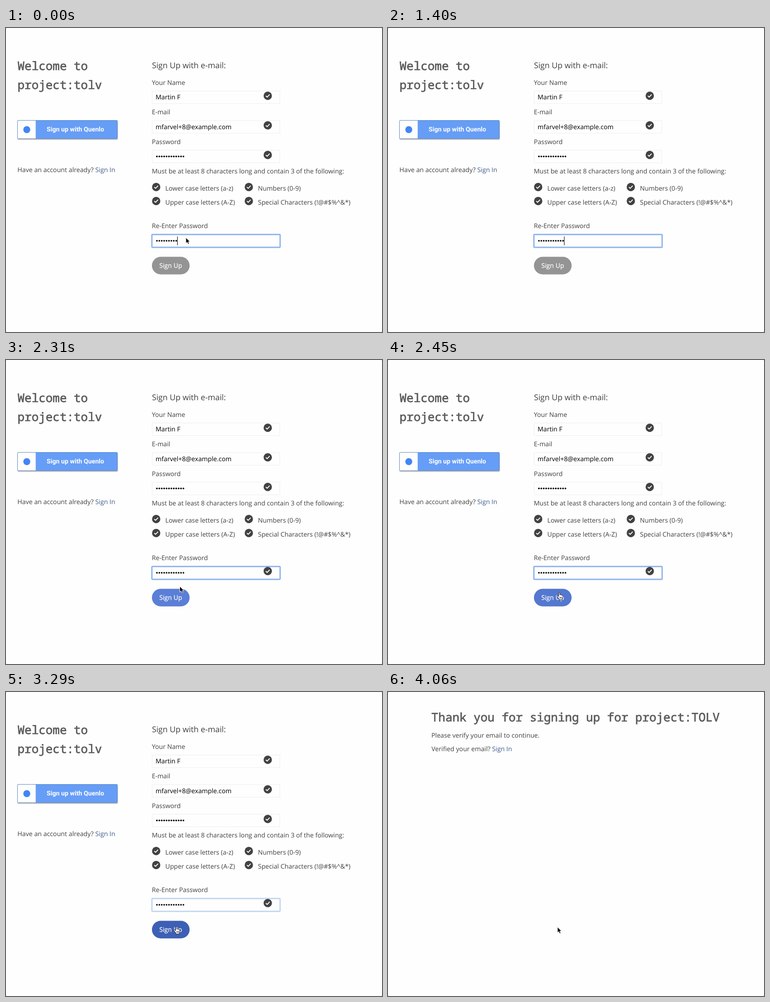
An HTML page for the animation above (5.39 s loop, 832 by 673 pixels).

```html
<!DOCTYPE html>
<html lang="en">
<head>
<meta charset="utf-8">
<title>Sign up</title>
<style>
  html, body { margin: 0; width: 100%; height: 100%; overflow: hidden; background: #fff; }
  svg { display: block; width: 832px; height: 673px; }
  text { font: 14.2px "Open Sans", "Noto Sans", sans-serif; fill: #404040; text-rendering: geometricPrecision; white-space: pre; }
  .title { font: 25.95px "Noto Sans Mono", "DejaVu Sans Mono", monospace; fill: #5c5c5c; stroke: #5c5c5c; stroke-width: .8; }
  .head { font-size: 17.75px; }
  .input { fill: #000; }
  .link { fill: #3f5a8c; }
  .light { fill: #fff; stroke: #fff; stroke-width: .25; }
  .brand { font: 600 14.2px Roboto, sans-serif; fill: #fff; }
</style>
</head>
<body>
<svg viewBox="0 0 832 673">
  <defs>
    <g id="check">
      <circle r="9.2" fill="#424242"/>
      <path d="M-4.2 .2L-1.3 3L4.2-2.8" fill="none" stroke="#fff" stroke-width="1.9"/>
    </g>
    <filter id="soft" x="-10%" y="-30%" width="120%" height="170%"><feGaussianBlur stdDeviation="1.2"/></filter>
  </defs>
  <rect width="832" height="673" fill="#c8c8c8"/>
  <rect width="832" height="673" rx="3" fill="#fefefe"/>

  <g id="form">
    <text class="title" x="25.5" y="93">Welcome to</text>
    <text class="title" x="25.5" y="135">project:tolv</text>

    <rect x="26" y="207" width="221" height="40" rx="1" fill="#000" opacity=".35" filter="url(#soft)"/>
    <rect x="25.5" y="204.5" width="221" height="40.5" rx="1.5" fill="#669df6"/>
    <rect x="26" y="205" width="39.7" height="40" fill="#fefefe"/>
    <rect x="25.5" y="204.5" width="221" height="40.5" rx="1.5" fill="none" stroke="#5f87c4"/>
    <circle cx="46" cy="225" r="7.7" fill="#4285f4"/>
    <text class="brand" x="90" y="229">Sign up with Quenlo</text>
    <text x="25.3" y="319">Have an account already? <tspan class="link">Sign In</tspan></text>

    <text class="head" x="322.9" y="89">Sign Up with e-mail:</text>
    <g id="labels"></g>
    <g id="fields" fill="#fefefe" stroke="#ededed"></g>
    <text class="input" x="331" y="158">Martin F</text>
    <text class="input" x="331" y="224">mfarvel+8@example.com</text>
    <g id="password"></g>
    <g id="checks"></g>

    <g id="focus" fill="none">
      <rect x="322.8" y="457.2" width="283.8" height="28.4" rx="2" stroke="#a9c8f5" stroke-width="4.2" opacity=".4"/>
      <rect x="322.8" y="457.2" width="283.8" height="28.4" rx="1.5" stroke="#86aeea" stroke-width="2.2"/>
    </g>
    <g id="repeat"></g>
    <rect id="caret" y="461.5" width="1.1" height="19.5" fill="#000"/>
    <use id="match" href="#check" x="579.2" y="467.3"/>

    <rect id="button" x="322.9" y="506.4" width="83.4" height="39.2" rx="19.6"/>
    <text class="light" x="339.2" y="531">Sign Up</text>
  </g>

  <g id="thanks">
    <text class="title" x="95.8" y="65">Thank you for signing up for project:TOLV</text>
    <text x="96" y="101">Please verify your email to continue.</text>
    <text x="96.2" y="131">Verified your email? <tspan class="link">Sign In</tspan></text>
  </g>

  <path id="arrow" d="M0 0V12.6L2.9 10L4.9 14.6L7.2 13.6L5.3 9.2H9Z" fill="#000" stroke="#fff" stroke-width="1" stroke-linejoin="round"/>
  <path id="hand" d="M0 .8C0-.6 2.3-.6 2.4 .8V5C3.2 4.3 4.6 4.6 4.8 5.5C5.6 4.9 6.9 5.3 7 6.2C8 5.7 9.1 6.3 9.1 7.5C9.1 11.2 8.3 12 7.7 13.6V15.8H.6V13.8C-.7 12-2.2 10.2-3.8 8.2C-4.7 7-3.2 6-2.1 6.9L0 8.8Z M2.5 9.6V13M4.4 9.6V13M6.3 9.6V13"
    fill="#fff" stroke="#111" stroke-width=".9" stroke-linejoin="round"/>
</svg>

<script>
const LOOP = 5390, SUBMIT = 4060;
const $ = id => document.getElementById(id);
const show = (id, on) => { $(id).style.display = on ? "" : "none"; };

function add(parent, tag, attrs, content = "") {
  const node = document.createElementNS("http://www.w3.org/2000/svg", tag);
  for (const key in attrs) node.setAttribute(key, attrs[key]);
  node.textContent = content;
  $(parent).append(node);
  return node;
}

const DOT_START = 331.3, DOT_STEP = 5.33;
const addDots = (parent, y) => Array.from({ length: 12 }, (_, i) =>
  add(parent, "circle", { cx: DOT_START + DOT_STEP * (i + 0.5), cy: y, r: 1.85 }));

const LEFT = 322.7, COLUMN_1 = 352.6, COLUMN_2 = 557.6;
[
  [LEFT, 126, "Your Name"],
  [LEFT, 191, "E-mail"],
  [LEFT, 257, "Password"],
  [LEFT, 322, "Must be at least 8 characters long and contain 3 of the following:"],
  [COLUMN_1, 360, "Lower case letters (a-z)"],
  [COLUMN_1, 391, "Upper case letters (A-Z)"],
  [COLUMN_2, 360, "Numbers (0-9)"],
  [COLUMN_2, 391, "Special Characters (!@#$%^&*)"],
  [LEFT, 443, "Re-Enter Password"]
].forEach(([x, y, label]) => add("labels", "text", { x, y }, label));

for (const y of [139.5, 205, 270.5, 457.5])
  add("fields", "rect", { x: 323.5, y, width: 282.5, height: 28, rx: 2 });

for (const [x, y] of [[579.2, 150], [579.2, 215.5], [579.2, 281],
  [332.3, 352], [332.3, 383], [537.3, 352], [537.3, 383]])
  add("checks", "use", { href: "#check", x, y });

addDots("password", 284.3);
const typedDots = addDots("repeat", 471);

const progress = (t, from, to) => Math.min(1, Math.max(0, (t - from) / (to - from)));
const mix = (a, b, k) => a.map((v, i) => v + (b[i] - v) * k);

const GRAY = [148, 148, 148], BLUE = [91, 127, 214], HOVER = [61, 96, 181];
const KEYSTROKES = [980, 1260, 1470];
const REST = [398, 464], EDGE = [384.6, 501], TARGET = [375, 520.3];

function pointerAt(t) {
  if (t < 2100) return REST;
  if (t < 2310) return mix(REST, EDGE, progress(t, 2100, 2310));
  return mix(EDGE, TARGET, progress(t, 2310, 2500));
}

function caretVisible(t) {
  if (t < 560) return true;
  if (t < 980) return false;
  return t < 2030 || (t >= 2520 && t < 3010);
}

function render(t) {
  const submitted = t >= SUBMIT;
  show("form", !submitted);
  show("thanks", submitted);

  const typed = 9 + KEYSTROKES.filter(k => t >= k).length;
  typedDots.forEach((dot, i) => { dot.style.display = i < typed ? "" : "none"; });
  $("caret").setAttribute("x", DOT_START + DOT_STEP * typed - 0.4);
  show("caret", caretVisible(t));
  show("match", typed === 12);
  $("focus").style.opacity = 1 - progress(t, 3150, 3430);

  const enabled = mix(GRAY, BLUE, progress(t, 1450, 1650));
  const fill = mix(enabled, HOVER, progress(t, 2380, 2700));
  $("button").setAttribute("fill", `rgb(${fill.map(Math.round)})`);

  const [x, y] = pointerAt(t);
  const pointing = !submitted && y > 507;
  show("arrow", !pointing && (t < 980 || t >= 2100));
  show("hand", pointing);
  $("arrow").setAttribute("transform", `translate(${x} ${y})`);
  $("hand").setAttribute("transform", `translate(${x + 0.4} ${y - 0.4})`);
}

const start = performance.now();
function tick() {
  render((performance.now() - start) % LOOP);
  requestAnimationFrame(tick);
}
tick();
</script>
</body>
</html>
```
